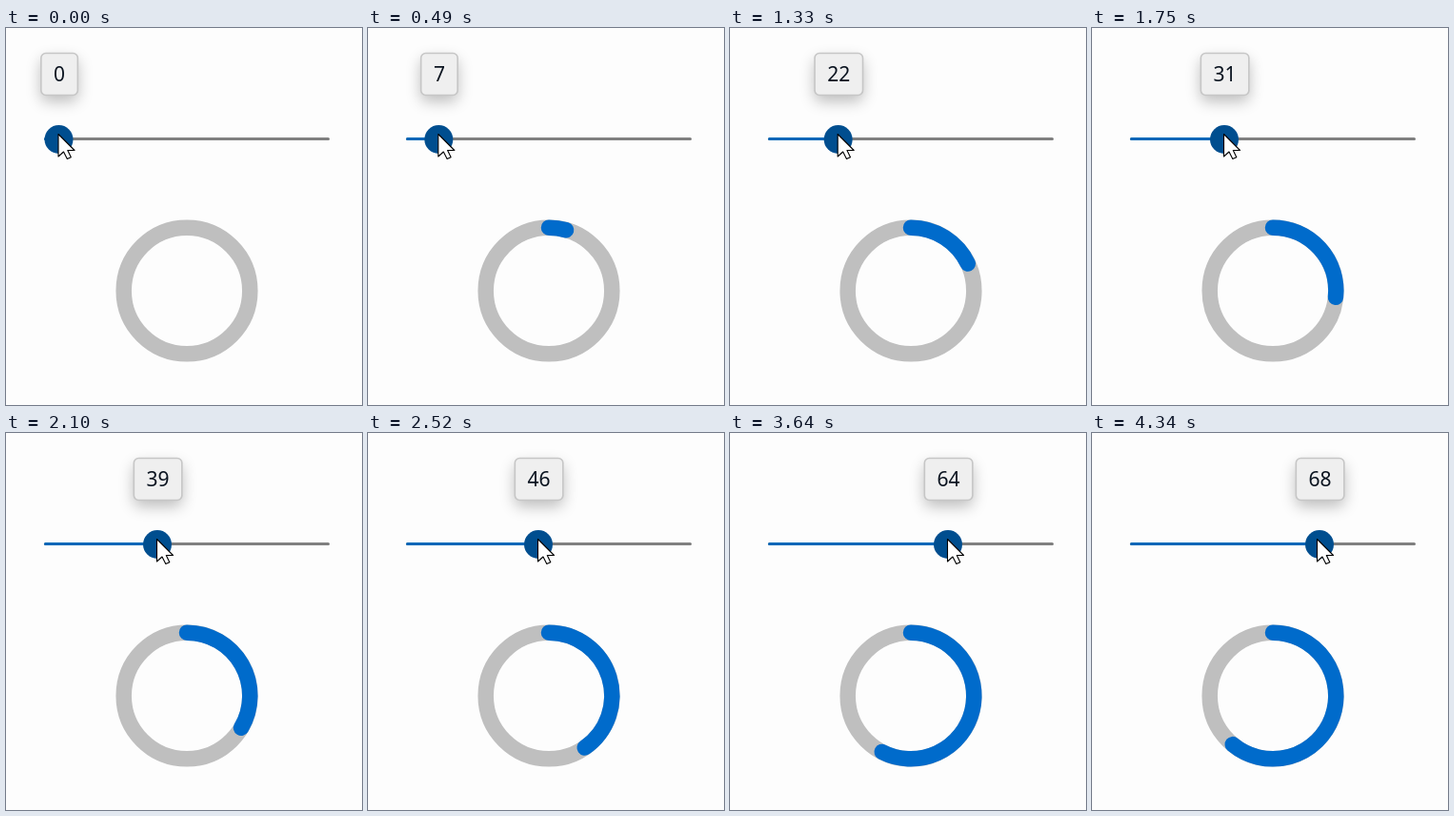
Recreate the animation shown at these times as an HTML page. Size 374 px wide and 396 px high, loop 4410 ms.

```html
<!DOCTYPE html>
<html lang="en">
<head>
<meta charset="utf-8">
<title>Slider and progress ring</title>
<style>
  html, body { margin: 0; width: 100%; height: 100%; overflow: hidden; background: #fdfdfd; }
  svg { display: block; width: 374px; height: 396px; }
  text { font: 21px "Noto Sans", "Open Sans", sans-serif; text-anchor: middle; fill: #0b1420; }
</style>
</head>
<body>
<svg viewBox="0 0 374 396">
  <defs>
    <filter id="blur" x="-100%" y="-100%" width="300%" height="300%">
      <feGaussianBlur stdDeviation="8"/>
    </filter>
  </defs>

  <g id="tip">
    <rect class="box" y="33" height="44" rx="5" fill="#000" opacity=".26" filter="url(#blur)"/>
    <rect class="box" y="26.5" height="44" rx="5" fill="#efefef" stroke="#c6c6c6" stroke-width="1.6"/>
    <text id="label" y="56"></text>
  </g>

  <g stroke-width="3" stroke-linecap="round">
    <path d="M41.5 116.5H338.5" stroke="#808080"/>
    <path id="filled" stroke="#0067b8"/>
  </g>
  <circle id="thumb" cy="117" r="15" fill="#004e8f"/>

  <g fill="none" stroke-width="16.5" stroke-linecap="round">
    <circle cx="190" cy="276" r="66.3" stroke="#bfbfbf"/>
    <path id="arc" stroke="#006bcb"/>
  </g>

  <path id="cursor" d="M0 0V23.5L5.5 18.5L9.3 26L13.3 24.2L9.8 17H17Z"
        fill="#fff" stroke="#000" stroke-width="1.1" stroke-linejoin="round"/>
</svg>
<script>
  const LOOP = 4410, STEP = 70;
  const RING = { x: 190, y: 276, r: 66.3 };
  // [time in ms, thumb centre x]
  const drag = [[0, 55.5], [560, 77], [910, 89], [1120, 101], [1750, 139], [2240, 167],
                [2520, 179], [2940, 199], [3640, 229], [4340, 239]];
  const $ = id => document.getElementById(id);
  const boxes = document.querySelectorAll(".box");

  function thumbAt(t) {
    const i = Math.max(1, drag.findIndex(([time]) => time >= t));
    const [t0, x0] = drag[i - 1], [t1, x1] = drag[i];
    return x0 + (x1 - x0) * (t - t0) / (t1 - t0);
  }

  function arcPath(degrees) {
    if (degrees <= 0) return "";
    const a = degrees * Math.PI / 180, { x, y, r } = RING;
    const endX = x + r * Math.sin(a), endY = y - r * Math.cos(a);
    return `M${x} ${y - r}A${r} ${r} 0 ${degrees > 180 ? 1 : 0} 1 ${endX} ${endY}`;
  }

  function draw(t) {
    const x = thumbAt(t);
    const value = Math.round((x - 55) / 2.7);
    const width = value < 10 ? 38.5 : 50.5;

    $("thumb").setAttribute("cx", x);
    $("filled").setAttribute("d", `M41.5 116.5H${x}`);
    $("arc").setAttribute("d", arcPath((x - 61.5) * 1.237));
    $("tip").setAttribute("transform", `translate(${x + 0.6} 0)`);
    $("label").textContent = value;
    for (const box of boxes) {
      box.setAttribute("x", -width / 2);
      box.setAttribute("width", width);
    }
    const lag = Math.max(0, t - 3640) / 700 * 2;
    $("cursor").setAttribute("transform", `translate(${x - 0.5 - lag} 111.5)`);
  }

  const start = performance.now();
  function tick() {
    const t = (performance.now() - start) % LOOP;
    draw(Math.floor(t / STEP) * STEP);
    requestAnimationFrame(tick);
  }
  tick();
</script>
</body>
</html>
```
